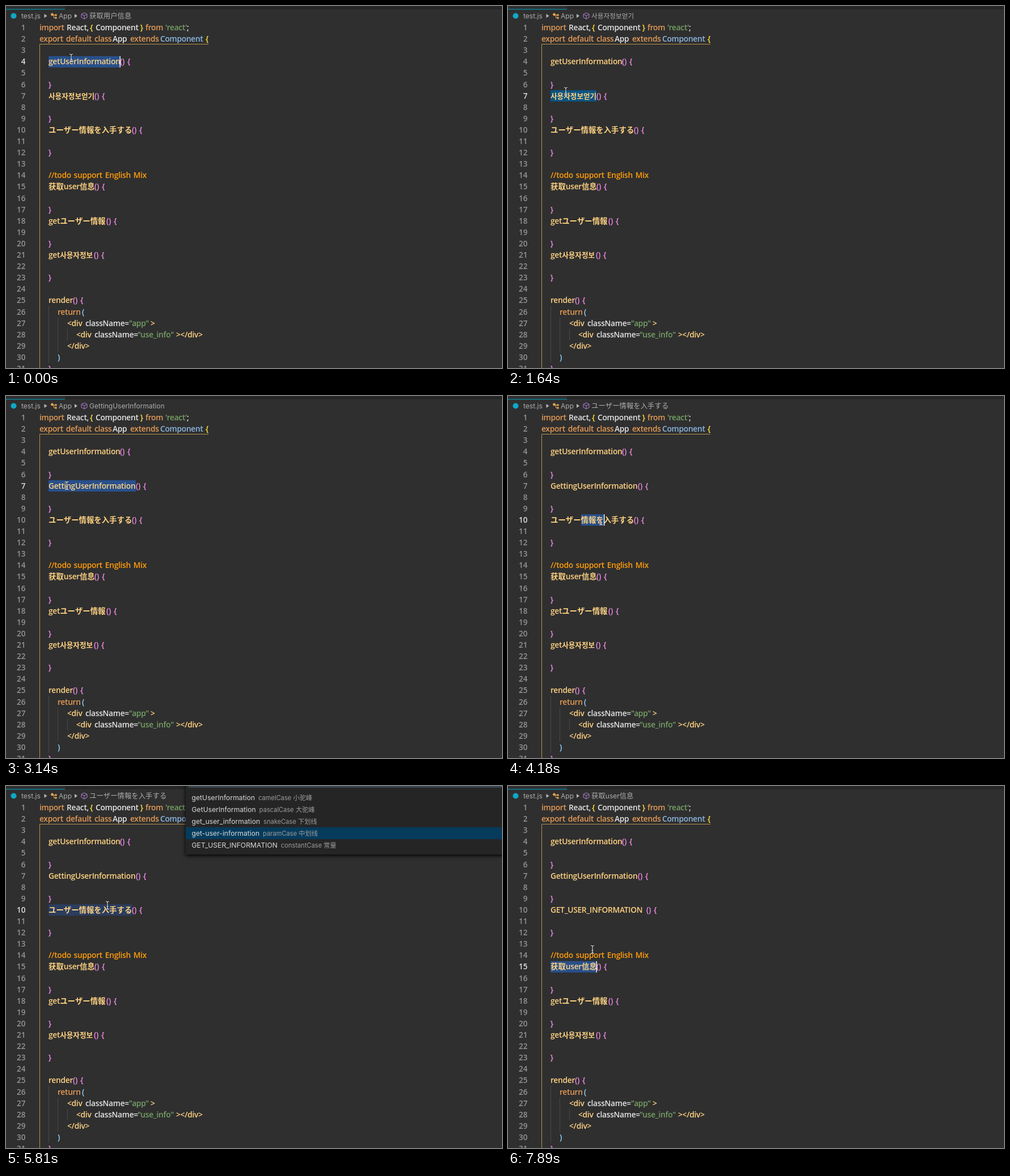
An HTML page with a canvas for the animation above (8 s loop, 875x640 px).

```html
<!DOCTYPE html>
<html lang="en">
<head>
<meta charset="utf-8">
<title>Identifier naming in an editor</title>
<style>
html, body { margin: 0; width: 100%; height: 100%; overflow: hidden; background: #2f2f2f; }
canvas { display: block; }
</style>
</head>
<body>
<canvas id="stage" width="875" height="640"></canvas>
<script>
const ctx = document.getElementById('stage').getContext('2d');
const LOOP = 8000, STEP = 149;

const BG = '#2f2f2f', KEYWORD = '#e39a55', PLAIN = '#e4e4e4', NAME = '#ffd282', TYPE = '#8ab6e0',
  STRING = '#75a065', GOLD = '#ffe23c', PINK = '#f08ae8', SKY = '#8fd3ff', COMMENT = '#ff9d0a',
  CRUMB_GREY = '#adadad';
const SELECTED = '#28508c', MATCHED = '#0b5482', UNFOCUSED = '#2b3d5f';

const CODE = { weight: 600, family: '"Open Sans"', latin: 13.8, cjk: 13.4, tracking: -0.3, wordGap: 1.5 };
const DIGITS = { ...CODE, latin: 13.5, tracking: 0 };
const CRUMB = { weight: 400, family: 'Inter', latin: 12, cjk: 12.4, tracking: 0, wordGap: 0 };
const ITEM = { ...CRUMB, latin: 12.2 };
const NOTE = { ...CRUMB, latin: 11.1, cjk: 11.3 };

// line number -> tokens [x, colour, text]
const CODE_LINES = {
  1: [[59, KEYWORD, 'import'], [107, PLAIN, 'React,'], [148, GOLD, '{'], [158, PLAIN, 'Component'],
      [237, GOLD, '}'], [246, KEYWORD, 'from'], [281, STRING, "'react'"], [319, PLAIN, ';']],
  2: [[59, KEYWORD, 'export default class'], [188, PLAIN, 'App'], [219, KEYWORD, 'extends'],
      [272, TYPE, 'Component'], [352, GOLD, '{']],
  14: [[75, COMMENT, '//todo support English Mix']],
  26: [[91, KEYWORD, 'return'], [134, SKY, '(']],
  27: [[108, NAME, '<div'], [140, PLAIN, 'className='], [217, STRING, '"app"'], [255, NAME, '>']],
  28: [[124, NAME, '<div'], [156, PLAIN, 'className='], [232, STRING, '"use_info"'], [300, NAME, '></div>']],
  29: [[108, NAME, '</div>']],
  30: [[91, SKY, ')']],
};
for (const line of [6, 9, 12, 17, 20, 23, 31]) CODE_LINES[line] = [[75, PINK, '}']];

// line number -> [method name, x where it ends]
const METHODS = {
  4: ['getUserInformation', 201], 15: ['获取user信息', 156], 18: ['getユーザー情報', 177],
  21: ['get사용자정보', 155], 25: ['render', 118],
};
const KOREAN = ['사용자정보얻기', 156], PASCAL = ['GettingUserInformation', 229];
const JAPANESE = ['ユーザー情報を入手する', 222], CONSTANT = ['GET_USER_INFORMATION', 244];
const CASES = ['camelCase 小驼峰', 'pascalCase 大驼峰', 'snakeCase 下划线', 'paramCase 中划线', 'constantCase 常量'];

// [step, changes]: every change holds until a later one replaces it
const EVENTS = [
  [0, { line7: KOREAN, line10: JAPANESE, crumb: '获取用户信息', line: 4, from: 75, to: 201,
        tone: SELECTED, caret: 201, menu: null, row: 0, match: false }],
  [2, { crumb: 'getUserInformation' }],
  [3, { caret: 0 }],
  [7, { line: 7, to: 156, tone: MATCHED, caret: 156 }],
  [9, { crumb: KOREAN[0] }],
  [11, { caret: 0 }],
  [13, { menu: 'getting', tone: UNFOCUSED }],
  [15, { row: 1 }],
  [18, { menu: null, line7: PASCAL, tone: SELECTED, to: 229, caret: 229 }],
  [20, { crumb: PASCAL[0] }],
  [21, { caret: 0 }],
  [25, { line: 10, from: 129, to: 156, caret: 156, match: true }],
  [27, { crumb: JAPANESE[0], to: 169.5, caret: 169.5, match: false }],
  [31, { from: 75, to: 222, caret: 222 }],
  [34, { caret: 0 }],
  [36, { menu: 'get', row: 0, tone: UNFOCUSED }],
  [38, { row: 4 }],
  [39, { row: 3 }],
  [43, { row: 4 }],
  [45, { menu: null, line10: CONSTANT, tone: SELECTED, to: 244, caret: 244 }],
  [48, { crumb: CONSTANT[0], caret: 0 }],
  [52, { line: 15, to: 156, caret: 156 }],
  [53, { crumb: '获取user信息' }],
];
// pointer stops [step, x, y]
const POINTER = [[0, 115, 92], [2, 115, 92], [7, 102, 157], [9, 102, 157], [10, 102, 151], [20, 102, 151],
  [25, 152, 222], [27, 164, 221], [28, 164, 221], [31, 179, 211], [48, 179, 211], [51, 149, 289], [54, 149, 289]];

const centre = line => 38.3 + 20.1 * (line - 1);

// Draws mixed Latin and East Asian text and returns the x where it ends.
function write(text, x, y, color, face) {
  ctx.fillStyle = color;
  for (const run of text.match(/[가-힣]+|[\u3000-\u30ff\u4e00-\u9fff]+|[^가-힣\u3000-\u30ff\u4e00-\u9fff]+/g)) {
    const hangul = /[가-힣]/.test(run), latin = !hangul && !/[\u3000-\u9fff]/.test(run);
    const size = hangul ? face.cjk * 0.942 : latin ? face.latin : face.cjk;
    ctx.font = `${face.weight} ${size}px ${face.family}, "Noto Sans CJK SC", "Noto Sans CJK JP", sans-serif`;
    ctx.letterSpacing = `${latin ? face.tracking : 0}px`;
    ctx.wordSpacing = `${face.wordGap}px`;
    ctx.fillText(run, x, y);
    x += ctx.measureText(run).width;
  }
  return x;
}

function rect(x, y, w, h, color) {
  ctx.fillStyle = color;
  ctx.fillRect(x, y, w, h);
}

function polygon(points, color) {
  ctx.beginPath();
  points.forEach(([x, y]) => ctx.lineTo(x, y));
  ctx.closePath();
  ctx.fillStyle = color;
  ctx.fill();
}

function strokePath(d, color, width) {
  ctx.strokeStyle = color;
  ctx.lineWidth = width;
  ctx.stroke(new Path2D(d));
}

function drawBreadcrumb(text) {
  rect(104, 0, 771, 6, '#262626');
  rect(0, 5, 104, 1.5, '#087f98');
  ctx.beginPath();
  ctx.arc(13.5, 17.5, 5, 0, 7);
  ctx.fillStyle = '#0fa7c4';
  ctx.fill();
  write('test.js', 27, 22, CRUMB_GREY, CRUMB);
  write('App', 93, 22, CRUMB_GREY, CRUMB);
  write(text, 147, 22, CRUMB_GREY, CRUMB);
  for (const x of [67.5, 121]) polygon([[x, 14], [x + 5, 17.5], [x, 21]], '#b5b5b5');
  for (const [x, y, r] of [[81.5, 15, 3], [88, 16, 2.2], [88, 21, 2.2]])
    polygon([[x - r, y], [x, y - r], [x + r, y], [x, y + r]], '#e8a552');
  strokePath('M83 16H87M84.5 16V21H87', '#e8a552', 1);
  strokePath('M138 12L143 14.5V20L138 23L133 20V14.5ZM133 14.5L138 17.3L143 14.5M138 17.3V23', '#b180d7', 1);
}

function drawSelection(s) {
  rect(s.from, centre(s.line) - 10, s.to - s.from, 20, s.tone);
  if (s.match) rect(150, centre(18) - 10, 27, 20, '#3d4d60');
}

function drawGuides() {
  strokePath('M357 67.5H59.5V640', '#b8934a', 1);
  strokePath('M75.5 530V631M91.5 551V611M108.5 571V591', '#484848', 1);
}

function drawCode(s) {
  const methods = { ...METHODS, 7: s.line7, 10: s.line10 };
  for (let line = 1; line <= 31; line++) {
    const y = centre(line) + 4.7;
    ctx.textAlign = 'right';
    write(String(line), 34.5, y, line === s.line ? '#e0e0e0' : '#949494', DIGITS);
    ctx.textAlign = 'left';
    for (const [x, color, text] of CODE_LINES[line] || []) write(text, x, y, color, CODE);
    if (methods[line]) {
      const [name, end] = methods[line];
      write(name, 75, y, NAME, CODE);
      write('()', end, y, PINK, CODE);
      write('{', end + 13, y, PINK, CODE);
    }
  }
  if (s.caret) rect(s.caret - 0.5, centre(s.line) - 10, 1.5, 20, '#f0f0f0');
}

function drawMenu(verb, row) {
  const title = verb[0].toUpperCase() + verb.slice(1);
  const labels = [verb + 'UserInformation', title + 'UserInformation', verb + '_user_information',
    verb + '-user-information', verb.toUpperCase() + '_USER_INFORMATION'];
  ctx.save();
  ctx.shadowColor = '#000';
  ctx.shadowBlur = 7;
  ctx.shadowOffsetY = 2;
  rect(317, -10, 570, 131, '#252526');
  ctx.restore();
  rect(322, 0, 553, 3, '#34454b');
  rect(317, 10 + 21 * row, 558, 21, '#063b5c');
  labels.forEach((label, i) => {
    const y = 25 + 21.1 * i;
    const end = write(label, 327.5, y, '#d8d8d8', ITEM);
    write(CASES[i], end + 6, y, '#9c9c9c', NOTE);
  });
}

function drawPointer(step) {
  const i = POINTER.findIndex(stop => stop[0] > step);
  const [s0, x0, y0] = POINTER[i - 1], [s1, x1, y1] = POINTER[i];
  const p = (step - s0) / (s1 - s0), eased = p * p * (3 - 2 * p);
  ctx.save();
  ctx.translate(x0 + (x1 - x0) * eased, y0 + (y1 - y0) * eased);
  const beam = 'M-3 -7Q0 -7 0 -5Q0 -7 3 -7M0 -5V5M-3 7Q0 7 0 5Q0 7 3 7M-1.5 2H1.5';
  strokePath(beam, 'rgba(0,0,0,.6)', 2.6);
  strokePath(beam, '#f4f4f4', 1.1);
  ctx.restore();
}

function frame(now) {
  const step = Math.floor((now % LOOP + 8) / STEP);
  const state = Object.assign({}, ...EVENTS.filter(([at]) => at <= step).map(([, change]) => change));
  rect(0, 0, 875, 640, BG);
  drawBreadcrumb(state.crumb);
  drawSelection(state);
  drawGuides();
  drawCode(state);
  if (state.menu) drawMenu(state.menu, state.row);
  drawPointer(step);
}

const start = performance.now();
function tick() {
  frame(performance.now() - start);
  requestAnimationFrame(tick);
}
tick();
</script>
</body>
</html>
```
